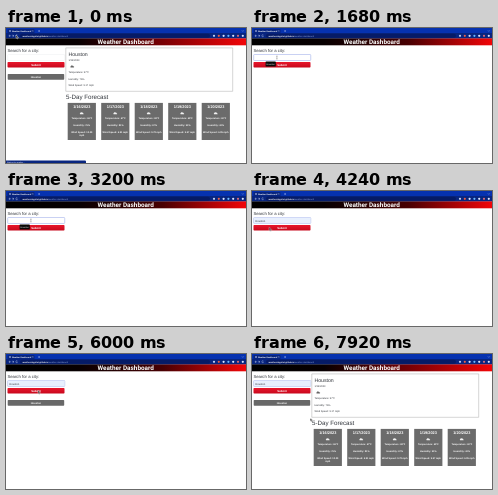
Write an HTML page that moves like this. It is 240 px wide and 135 px high and loops after 8000 ms.

```html
<!DOCTYPE html>
<html lang="en">
<head>
<meta charset="utf-8">
<title>Weather Dashboard</title>
<style>
html, body { margin: 0; width: 100%; height: 100%; overflow: hidden; background: #fff; }
svg { display: block; width: 100vw; height: 100vh; }
text { font-family: "Liberation Sans", Arial, sans-serif; text-rendering: geometricPrecision; fill: #30343a; }
.title { font: bold 6.4px Roboto, sans-serif; }
.small { font-size: 2.5px; }
.mid, .day text { text-anchor: middle; }
.white, .day text { fill: #fff; }
.bold, .day text { font-weight: bold; }
.day text { font-size: 2.4px; }
.day .date { font-size: 3.9px; }
.loop { animation: 8s step-end infinite; }

.status { animation-name: status; }
.focus { animation-name: focus; }
.hint { animation-name: hint; }
.value { animation-name: value; }
.history { animation-name: history; }
.result { animation-name: result; }
.details { animation-name: details; }
.brief { animation-name: brief; }
.arrow { animation-name: arrow; }
.pointer { animation: move 8s ease-in-out infinite; }
.fade { animation: fade 8s linear infinite; }

@keyframes status { 0% { opacity: 1 } 13%, 100% { opacity: 0 } }
@keyframes focus { 0% { opacity: 0 } 18%, 100% { opacity: 1 } }
@keyframes hint { 0% { opacity: 0 } 20% { opacity: 1 } 45%, 100% { opacity: 0 } }
@keyframes value { 0% { opacity: 0 } 45%, 100% { opacity: 1 } }
@keyframes history { 0% { opacity: 1 } 6% { opacity: 0 } 75%, 100% { opacity: 1 } }
@keyframes result { 0% { opacity: 1 } 6% { opacity: 0 } 79%, 100% { opacity: 1 } }
@keyframes details { 0% { opacity: 1 } 6% { opacity: 0 } 86%, 100% { opacity: 1 } }
@keyframes brief { 0% { opacity: 0 } 79% { opacity: 1 } 86%, 100% { opacity: 0 } }
@keyframes arrow { 0% { opacity: 1 } 18% { opacity: 0 } 45%, 100% { opacity: 1 } }
@keyframes move {
  0%, 7% { transform: translate(10px, 7px) }
  17%, 36% { transform: translate(24px, 28.5px) }
  46%, 54% { transform: translate(17.2px, 36.3px) }
  63%, 77% { transform: translate(32px, 36.3px) }
  84%, 100% { transform: translate(58.3px, 64px) }
}
@keyframes fade {
  0%, 6% { stop-color: #780004 }
  9%, 76% { stop-color: #480002 }
  81%, 100% { stop-color: #780004 }
}
</style>
</head>
<body>
<svg viewBox="0 0 240 135" preserveAspectRatio="none">
  <defs>
    <linearGradient id="banner">
      <stop offset="0" stop-color="#000"/>
      <stop offset=".3" stop-color="#080001"/>
      <stop class="fade" offset=".65"/>
      <stop offset="1" stop-color="#f20508"/>
    </linearGradient>
    <linearGradient id="red" x2="0" y2="1">
      <stop stop-color="#e8172c"/><stop offset="1" stop-color="#c8081c"/>
    </linearGradient>
    <path id="cloud" d="M-1.7 1a.7.7 0 0 1 .2-1.2a1 1 0 0 1 1.8-.4a.8.8 0 0 1 1 .6a.5.5 0 0 1 .1 1z"/>
  </defs>
  <rect width="240" height="135" fill="#fff"/>

  <!-- browser bars -->
  <rect width="240" height="5.4" fill="#0632b0"/>
  <rect y="5" width="240" height="5.6" fill="#08257f"/>
  <path d="M1.5 5.2V2q0-1 1-1h25q1 0 1 1v3.2z" fill="#08257f"/>
  <circle cx="4" cy="3" r=".8" fill="#dce4ff"/>
  <text x="6" y="3.7" font-size="2" class="white bold">Weather Dashboard</text>
  <path d="M26 2.4l1.1 1.1m0-1.1l-1.1 1.1M32.2 3h1.8m-.9-.9v1.8" stroke="#d5defa" stroke-width=".4"/>
  <path d="M236 2.5l.8.8.8-.8" fill="none" stroke="#d5defa" stroke-width=".4"/>
  <rect x="14" y="5.8" width="190" height="4" rx="2" fill="#061b66"/>
  <g fill="none" stroke="#d5defa" stroke-width=".4">
    <path d="M4 6.8L2.9 7.8 4 8.8M2.9 7.8h2M6.8 6.8l1.1 1-1.1 1M5.9 7.8h2"/>
    <path d="M11.5 7.1a1 1 0 1 0 .2 1.1"/>
  </g>
  <text x="16.5" y="8.6" font-size="2.15" class="white bold">weatherskypilot.github.io<tspan font-weight="normal" fill="#8ea5df">/weather-dashboard/</tspan></text>
  <g id="icons"></g>

  <rect y="10.4" width="240" height="6.9" fill="url(#banner)"/>
  <text x="119.7" y="16.1" class="title mid white">Weather Dashboard</text>

  <!-- search -->
  <text x="1.4" y="24.4" font-size="4.25">Search for a city:</text>
  <rect x="1.7" y="26.5" width="57" height="6" rx=".7" fill="#fff" stroke="#dfe2e6" stroke-width=".3"/>
  <rect class="loop focus" x="1.7" y="26.5" width="57" height="6" rx=".7" fill="#fff" stroke="#b3bff0" stroke-width=".7"/>
  <g class="loop value">
    <rect x="2" y="26.8" width="56.4" height="5.4" rx=".5" fill="#e8f0fe"/>
    <text x="3.3" y="30.5" font-size="2.7">Houston</text>
  </g>
  <rect x="1.5" y="34" width="57" height="5.5" rx=".7" fill="url(#red)"/>
  <text x="30" y="37.8" font-size="2.8" class="mid white bold">Submit</text>
  <g class="loop hint">
    <path d="M24.2 28.1h1.4m-.7 0v2.8m-.7 0h1.4" stroke="#333" stroke-width=".3"/>
    <rect x="13.6" y="33.4" width="10.2" height="5.2" rx=".6" fill="#080808"/>
    <text x="18.7" y="36.9" font-size="2.2" class="mid white">Houston</text>
  </g>
  <g class="loop history">
    <rect x="1.7" y="46.1" width="56.5" height="5.7" rx=".7" fill="#686868"/>
    <text x="29.9" y="49.8" font-size="2.6" class="mid white bold">Houston</text>
  </g>

  <!-- weather -->
  <g class="loop result">
    <path d="M59.8 19.9H226.7V63.3H59.8z" fill="none" stroke="#aaa" stroke-width=".5"/>
    <text x="62.4" y="28.1" font-size="5.2">Houston</text>
    <text x="62.4" y="32.9" class="small">1/15/2023</text>
  </g>
  <g class="loop brief">
    <text x="62.4" y="43.1" class="small">Temperature: 57°F</text>
    <text x="62.4" y="49.1" class="small">Humidity: 76%</text>
    <text x="62.4" y="55.1" class="small">Wind Speed: 9.17 mph</text>
  </g>
  <g class="loop details">
    <use href="#cloud" x="66.3" y="38.4" fill="#666"/>
    <text x="62.4" y="45" class="small">Temperature: 57°F</text>
    <text x="62.4" y="51.5" class="small">Humidity: 76%</text>
    <text x="62.4" y="58" class="small">Wind Speed: 9.17 mph</text>
    <text x="60" y="71.4" font-size="6.2">5-Day Forecast</text>
    <g id="days"></g>
  </g>

  <g class="loop status">
    <path d="M0 132.4h79q1 0 1 1v1.6H0z" fill="#08257f"/>
    <text x="1" y="134.5" font-size="1.9" class="white">Waiting for weather...</text>
  </g>
  <g class="pointer">
    <path class="loop arrow" d="M0 0v3.4l.8-.7.6 1.3.6-.3-.6-1.2h1.1z" fill="#111" stroke="#fff" stroke-width=".4"/>
  </g>
</svg>
<script>
const days = [
  [66, 76, "10.29"], [67, 81, "6.91"], [68, 67, "9.78"], [65, 53, "5.57"], [60, 42, "6.85"]
];
const cardWidth = 28.2, gap = 33.5;
const line = (x, y, s, name = "") => `<text x="${x}" y="${y}" class="${name}">${s}</text>`;

document.getElementById("days").innerHTML = days.map(([temp, humid, wind], i) => {
  const x = 61.7 + i * gap, c = x + cardWidth / 2;
  const speed = wind.length > 4
    ? line(c, 104.8, `Wind Speed: ${wind}`) + line(c, 108.3, "mph")
    : line(c, 104.8, `Wind Speed: ${wind} mph`);
  return `<g class="day"><rect x="${x}" y="74.9" width="${cardWidth}" height="37.1" fill="#6b6b6b"/>
    ${line(c, 80.3, `1/${16 + i}/2023`, "date")}
    <use href="#cloud" x="${c}" y="85.2" fill="#f2f2f2"/>
    ${line(c, 91.3, `Temperature: ${temp}°F`)}${line(c, 98, `Humidity: ${humid}%`)}${speed}</g>`;
}).join("");

const tints = ["#c5d2f5", "#e85d4a", "#dce4ff", "#69b7ff", "#dce4ff", "#d66b7b", "#dce4ff"];
document.getElementById("icons").innerHTML = tints.map((c, i) =>
  `<circle cx="${208 + i * 4.8}" cy="7.8" r="1.1" fill="${c}"/>`).join("");
</script>
</body>
</html>
```
